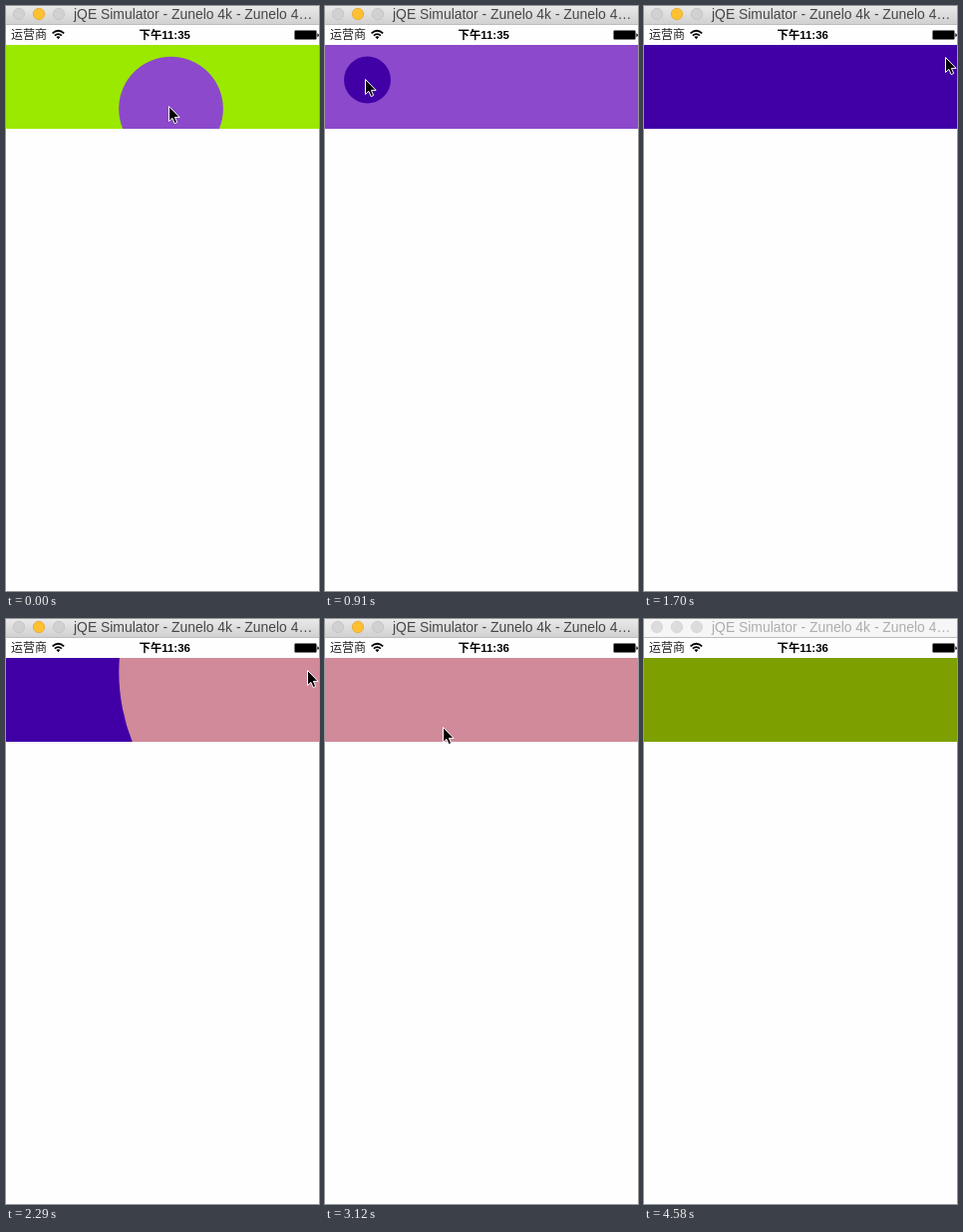
Recreate the animation shown at these times as an HTML page. Size 314 px wide and 586 px high, loop 4.61 s.

```html
<!DOCTYPE html>
<html lang="zh">
<head>
<meta charset="utf-8">
<style>
  html, body { margin: 0; height: 100%; overflow: hidden; background: #fefefe; }
  svg { display: block; width: 100vw; height: 100vh; }
  text { font-family: "Liberation Sans", "Noto Sans CJK SC", "Noto Sans CJK", sans-serif; }
  .title { font-size: 13.9px; fill: #464646; }
  .light { fill: #d1d1d1; stroke: #bfbfbf; stroke-width: .7; }
  .amber { fill: #ffc12f; stroke: #e2a02a; }
  .inactive .bar { fill: #f6f6f6; }
  .inactive .title { fill: #adadad; }
  .inactive .light { fill: #dcdcdc; stroke: #d0d0d0; }
</style>
</head>
<body>
<svg viewBox="0 0 314 586">
  <defs>
    <linearGradient id="chrome" x2="0" y2="1">
      <stop stop-color="#e9e9e9"/><stop offset="1" stop-color="#d1d1d1"/>
    </linearGradient>
    <clipPath id="panelClip"><rect y="39" width="314" height="84"/></clipPath>
  </defs>

  <g id="window">
    <rect class="bar" width="314" height="18" fill="url(#chrome)"/>
    <rect y="18" width="314" height="1" fill="#bdbdbd"/>
    <circle class="light" cx="13" cy="8" r="5.7"/>
    <circle class="light amber" cx="33" cy="8" r="5.7"/>
    <circle class="light" cx="53" cy="8" r="5.7"/>
    <text class="title" x="68" y="12.5">jQE Simulator - Zunelo 4k - Zunelo 4…</text>
  </g>

  <text x="5" y="33.4" font-size="12" fill="#222">运营商</text>
  <g fill="none" stroke="#000" stroke-width="1.8">
    <path d="M46.6 27.3Q52.4 22.1 58.2 27.3M48.9 29.7Q52.4 26.5 55.9 29.7"/>
    <path d="M50.4 31.1Q52.4 29.3 54.4 31.1L52.4 33.3Z" fill="#000" stroke="none"/>
  </g>
  <text id="clock" x="159.2" y="33" font-size="11.4" font-weight="bold" text-anchor="middle"></text>
  <rect x="289.5" y="24.5" width="22" height="9" rx="1.2" stroke="#777" stroke-width=".8"/>
  <path d="M312.4 27.3q1.4.4 1.4 1.9t-1.4 1.9z"/>

  <g clip-path="url(#panelClip)">
    <rect id="panel" y="39" width="314" height="84"/>
    <circle id="ripple"/>
  </g>
  <path id="cursor" d="M0 0V15L3.4 11.9L5.7 17.1L8.2 16L5.9 10.9H10.6Z" stroke="#fff"/>
</svg>
<script>
const LOOP = 4610, GROW = 200;
const $ = id => document.getElementById(id);
const set = (id, attrs) => Object.entries(attrs).forEach(([k, v]) => $(id).setAttribute(k, v));
const clamp = u => Math.min(1, Math.max(0, u));
const smooth = u => u * u * (3 - 2 * u);

const taps = [
  { start: -58, x: 165.5, y: 103, color: '#8c49cb' },
  { start: 894, x: 42.5, y: 74, color: '#4000a6' },
  { start: 2169, x: 303, y: 53, color: '#d08a99' },
  { start: 3294, x: 120.5, y: 110, color: '#7da000' }
];

// Pointer moves: start, end, destination
const home = [163, 100];
const glides = [
  [150, 600, 40, 73],
  [945, 1360, 318, 88],
  [1390, 1540, 318, 51],
  [1550, 1700, 302, 51],
  [2560, 2830, 6, 112],
  [2830, 3115, 118, 108],
  [3494, 3715, 234, 489],
  [3840, 4040, 255, 590]
];

function pointer(t) {
  let [x, y] = home;
  for (const [start, end, toX, toY] of glides) {
    const u = smooth(clamp((t - start) / (end - start)));
    x += (toX - x) * u;
    y += (toY - y) * u;
  }
  return [x, y];
}

function draw(t) {
  const n = taps.filter(tap => tap.start <= t).length - 1;
  const { start, x, y, color } = taps[n];
  const grown = clamp((t - start) / GROW);
  const reach = Math.hypot(Math.max(x, 314 - x), Math.max(y - 39, 123 - y)); // farthest corner
  const previous = n ? taps[n - 1].color : '#9be800';
  const [px, py] = pointer(t);

  set('panel', { fill: grown < 1 ? previous : color });
  set('ripple', { cx: x, cy: y, r: reach * grown, fill: color });
  set('cursor', { transform: `translate(${px + .5} ${py + .5})` });
  set('window', { class: t < 4580 ? '' : 'inactive' });
  $('clock').textContent = t < 1150 ? '下午11:35' : '下午11:36';
}

const origin = performance.now();
function tick() {
  draw((performance.now() - origin) % LOOP);
  requestAnimationFrame(tick);
}
tick();
</script>
</body>
</html>
```
